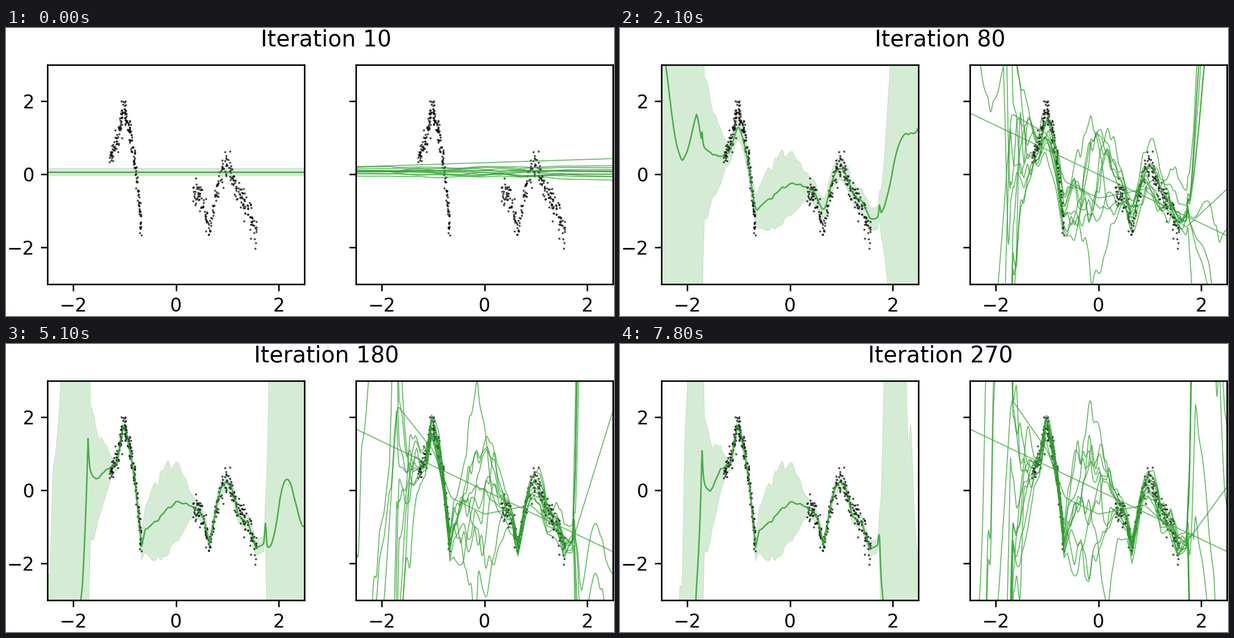
A matplotlib script for the animation above (8 s loop, 1086 px wide and 516 px high).

```python
import numpy as np
import matplotlib.pyplot as plt
from matplotlib.animation import FuncAnimation

W, H, DPI = 1086, 516, 240
GREEN = "tab:green"
X = np.linspace(-2.5, 2.5, 501)
rng = np.random.default_rng(4)

# key points of the hidden curve: left peak, gap, right peak
TREND = np.array([
    (-2.5, .6), (-1.3, .58), (-1.15, .75), (-1.03, 1.78), (-.96, 1.55), (-.88, 1.0), (-.8, .3),
    (-.67, -1.55), (-.6, -1.1), (-.3, -.75), (0, -.32), (.25, -.4), (.45, -.6), (.55, -.8),
    (.65, -1.5), (.8, -.35), (.88, .08), (.97, .25), (1.08, .1), (1.22, -.7), (1.4, -.9),
    (1.55, -1.6), (1.7, -1.5), (2.5, -1.5)])


def trend(x):
    return np.interp(x, *TREND.T)


def smooth(v, n):
    k = np.hanning(n + 2)[1:-1]
    return np.convolve(np.pad(v, n // 2, mode="edge"), k / k.sum(), "valid")


def noise(step):
    """Smooth random curve over X with the given correlation length."""
    knots = np.arange(-2.5, 2.5 + 2 * step, step)
    v = np.interp(X, knots, rng.normal(size=knots.size))
    return smooth(v, 2 * int(step * 40) + 1)


def ramp(x, start, end):
    return np.clip((x - start) / (end - start), 0, 1)


def logistic(x, mid, width):
    return 1 / (1 + np.exp((mid - x) / width))


def cluster(n, lo, hi):
    x = rng.uniform(lo, hi, n)
    return x, np.minimum(trend(x) + rng.normal(0, .19, n), 2)


(xa, ya), (xb, yb) = cluster(190, -1.3, -.67), cluster(215, .33, 1.57)
DX, DY = np.append(xa, xb), np.append(ya, yb)

texture = noise(.05)
LEFT = np.maximum(-1.72 - X, 0)
RIGHT = np.maximum(X - 1.72, 0)


def mean_at(it):
    fit = 1 - np.exp((10 - it) / 45)
    grown = ramp(it, 10, 60)
    wild = ramp(it, 50, 110)
    blur = 1 + 2 * int(90 * np.exp(-it / 40))
    y = .07 + fit * (smooth(trend(X), blur) - .07)
    y += grown * ramp(-X, 1.35, 1.55) * (.45 - it / 260)

    # extrapolation: drift, ripple and a narrow spike on each side
    drift = np.interp(it, [10, 60, 120, 160, 210], [0, 1.5, 5, -7, -35])
    y += drift * LEFT
    y += grown * 1.25 * ramp(LEFT, 0, .1) * np.sin(7 * LEFT + .09 * (it - 60))
    y += wild * 1.1 * np.exp(-abs(X + 1.71) / .025)
    drift = np.interp(it, [10, 60, 120, 160, 210, 270], [0, -.3, 12, 2.5, 1, -14])
    y += drift * RIGHT
    y += wild * ramp(RIGHT, 0, .3) * np.sin(8 * RIGHT - 1.7)
    y += wild * .6 * np.exp(-((X - 1.74) / .02) ** 2)
    return y + grown * .025 * texture


def spread_at(it):
    grown = ramp(it, 10, 60)
    late = max(it - 60, 0)
    s = .1 + .18 * np.exp(-late / 50)
    s += (.15 + .75 * (1 - np.exp(-late / 25))) * np.exp(-((X + .2) / .42) ** 4)
    s += 1.4 * ramp(-X, 1.25, 1.6)
    left = 400 * logistic(it, 72, 6) * np.maximum(-1.66 - X, 0) ** 1.5
    right = 180 * logistic(it, 108, 16) * RIGHT ** 1.5
    s += np.minimum(left, 10) + np.minimum(right, 12)
    return (.1 + grown * s) * (1 + grown * .07 * texture)


# ---- sampled functions: mean + spread * slowly turning random curves

N = 10
hold = np.clip(np.arange(X.size), 65, 435)
coarse = [(noise(.4)[hold], noise(.4)[hold]) for _ in range(N)]
fine = [(noise(.07), noise(.07)) for _ in range(N)]
rough = np.linspace(.05, .5, N)
offset = rng.permutation(np.linspace(-1.3, 1.2, N))
slope = rng.normal(0, .5, N)
inner = smooth((abs(X) < 1.7).astype(float), 15)


def turn(pair, angle):
    return np.cos(angle) * pair[0] + np.sin(angle) * pair[1]


def sample(k, it, mean, spread):
    g = ramp(it, 10, 50)
    start = offset[k] + slope[k] * X / 2.5 + .25 * coarse[k][0]
    z = 1.25 * turn(coarse[k], it / 170) + rough[k] * inner * turn(fine[k], it / 57)
    return mean + spread * ((1 - g) * start + g * z)


def straight(it):
    g = ramp(it, 10, 60)
    return (1 - g) * (.32 + .045 * X) - g * .67 * X


def stiff(it):
    """The one sample that stays nearly piecewise linear."""
    g = ramp(it, 10, 60)
    peak = 2.6 - 1.2 * np.exp((60 - it) / 80)
    end = np.interp(it, [60, 120, 160, 270], [-2, 2.8, 2.65, .1])
    y = np.interp(X, [-2.5, -1.95, -1.7, -1, -.65, 0, .9, 1.7, 2.5],
                  [-8, -3, peak, 1.1, -.2, -.65, -.4, -1.45, end])
    return (1 - g) * .1 + g * smooth(y, 9)


# ---- figure

plt.rcParams["font.family"] = "DejaVu Sans"
fig = plt.figure(figsize=(W / DPI, H / DPI), dpi=DPI, facecolor="white")


def panel(left):
    ax = fig.add_axes([left / W, 1 - 458.8 / H, 459 / W, 393 / H])
    ax.set(xlim=(-2.5, 2.5), ylim=(-3, 3), xticks=[-2, 0, 2], yticks=[-2, 0, 2])
    ax.tick_params(labelsize=10)
    ax.scatter(DX, DY, s=1.3, c="black", alpha=.7, linewidths=0, zorder=1.5)
    return ax


ax1, ax2 = panel(74.2), panel(625.2)
ax2.tick_params(labelleft=False)
title = fig.text(572.2 / W, 1 - 32.4 / H, "", fontsize=12, ha="center", va="baseline")
band, = ax1.fill([0, 0, 0], [0, 0, 0], color=GREEN, alpha=.2, lw=.3, zorder=1)
mid_line, = ax1.plot([], [], color=GREEN, alpha=.82, lw=.8)
lines = [ax2.plot([], [], color=GREEN, alpha=.7, lw=.55)[0] for _ in range(N + 2)]


def draw(i):
    it = 10 * (i // 3 + 1)
    mean, spread = mean_at(it), spread_at(it)
    title.set_text(f"Iteration {it}")
    edge = np.append(mean + spread, (mean - spread)[::-1])
    band.set_xy(np.column_stack([np.append(X, X[::-1]), np.clip(edge, -8, 8)]))
    mid_line.set_data(X, mean)
    curves = [sample(k, it, mean, spread) for k in range(N)] + [straight(it), stiff(it)]
    for line, y in zip(lines, curves):
        line.set_data(X, y)
    return [title, band, mid_line, *lines]


anim = FuncAnimation(fig, draw, frames=80, interval=100, repeat=True, repeat_delay=0, blit=False)
plt.show()
```
